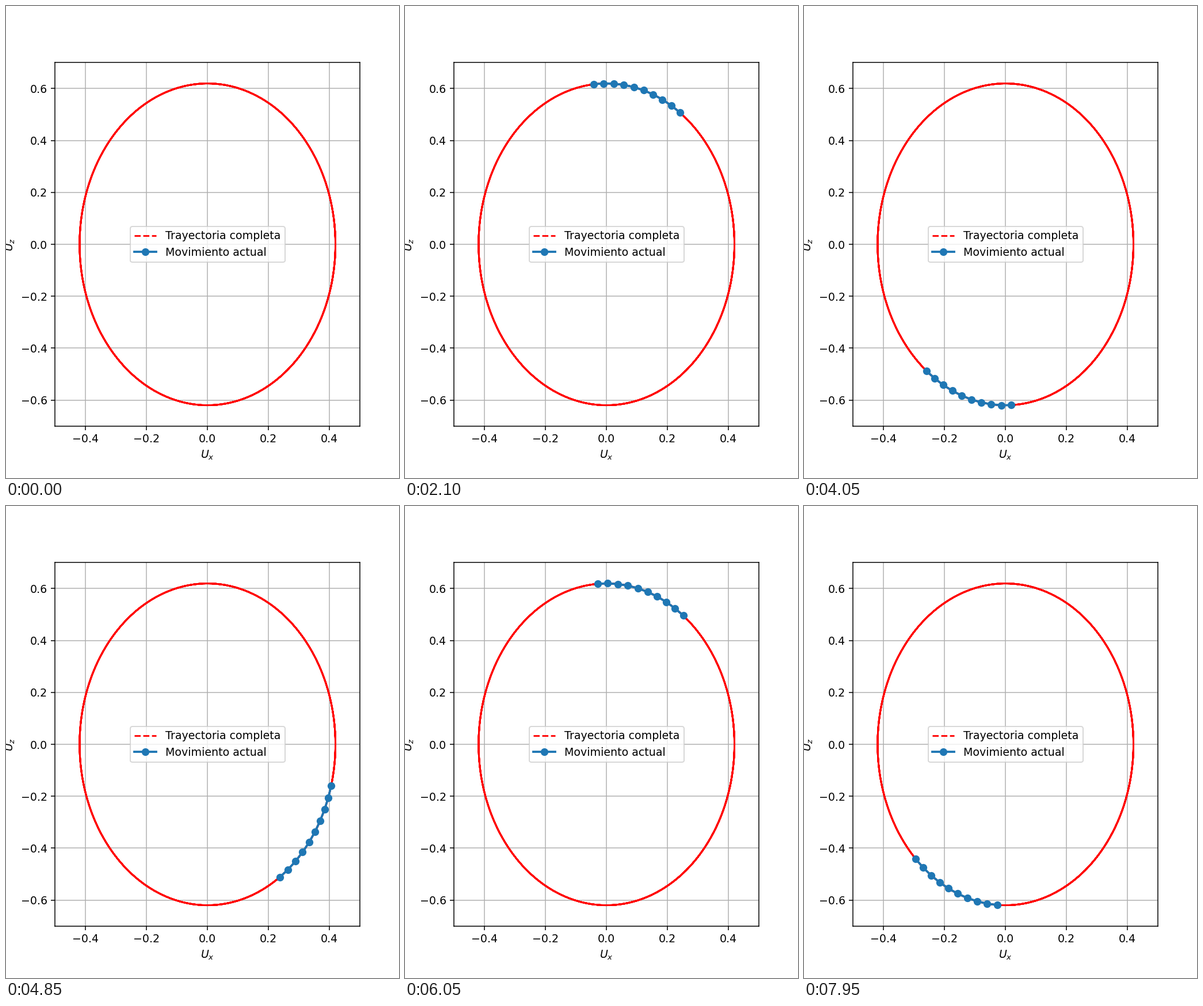
A matplotlib script for the animation above (8000 ms loop, 683 px wide and 820 px high).

```python
import numpy as np
import matplotlib.pyplot as plt
from matplotlib.animation import FuncAnimation

FRAMES, INTERVAL = 160, 50
TRAIL = 10

# Elliptic orbit, starting at the bottom and running counter-clockwise
phase = 2 * np.pi * np.linspace(0, 2 * np.pi, 500)
ux = 0.42 * np.sin(phase)
uz = -0.62 * np.cos(phase)

fig, ax = plt.subplots(figsize=(5, 6), dpi=136.67)
ax.plot(ux, uz, "r--", label="Trayectoria completa")
trail, = ax.plot([], [], "o-", color="tab:blue", lw=2, label="Movimiento actual")

ax.set_xlim(-0.5, 0.5)
ax.set_ylim(-0.7, 0.7)
ax.set_xlabel("$U_x$")
ax.set_ylabel("$U_z$")
ax.grid(True)
ax.legend(loc="center")


def update(i):
    part = slice(max(0, i - TRAIL), i)
    trail.set_data(ux[part], uz[part])
    return trail,


anim = FuncAnimation(fig, update, frames=FRAMES, interval=INTERVAL,
                     init_func=lambda: update(0), repeat=True, repeat_delay=0)
plt.show()
```
